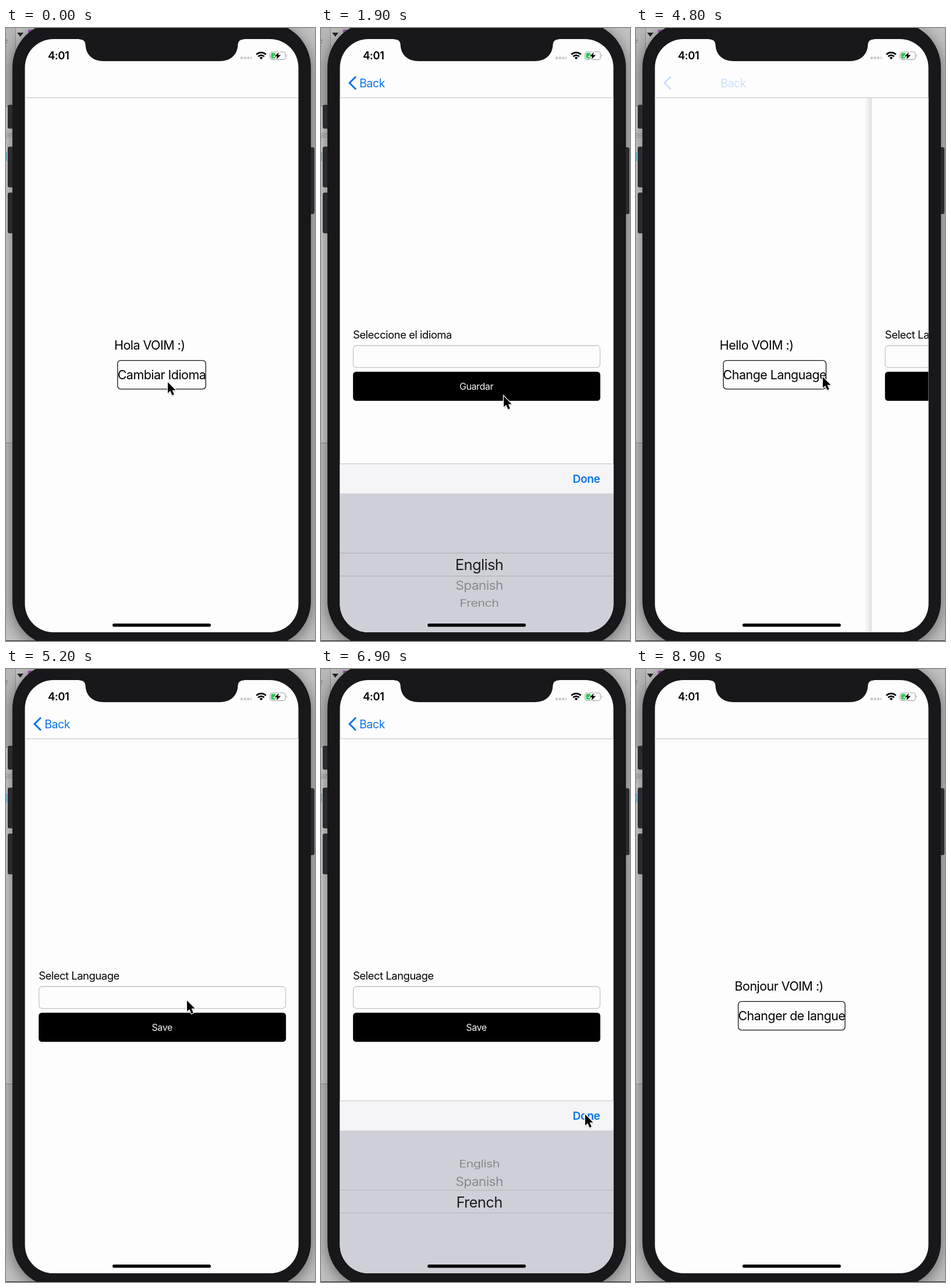
Animation of 531 by 1054 pixels, one loop 9.2 s. Source, as an HTML page:

```html
<!DOCTYPE html>
<html lang="en">
<head>
<meta charset="utf-8">
<title>Language switcher</title>
<style>
  html, body { margin: 0; width: 100%; height: 100%; overflow: hidden; background: #a9a9a9; }
  svg { display: block; width: 100%; height: 100%; }
  text { font-family: Inter, "Liberation Sans", sans-serif; letter-spacing: -.025em; white-space: pre; }
  .mid { text-anchor: middle; }
  .big { font-size: 21.5px; }
  .label { font-size: 18.4px; }
  .blue { fill: #0a75ea; }
  .paper { fill: #fefdfe; }
  .body { fill: #18171a; }
  .side { fill: #2b2b2d; }
</style>
</head>
<body>
<svg viewBox="0 0 531 1054">
  <defs>
    <clipPath id="screenClip"><rect x="32.5" y="19" width="470" height="1020" rx="49"/></clipPath>
    <filter id="blur" x="-20%" y="-10%" width="140%" height="120%"><feGaussianBlur stdDeviation="14"/></filter>
    <filter id="soft" x="-50%" y="-50%" width="200%" height="200%"><feGaussianBlur stdDeviation="1.2"/></filter>
    <linearGradient id="edge"><stop stop-opacity="0"/><stop offset="1" stop-opacity=".12"/></linearGradient>
    <linearGradient id="shine"><stop stop-color="#333"/><stop offset=".6" stop-color="#555"/><stop offset="1" stop-color="#888"/></linearGradient>
  </defs>

  <!-- desktop behind the phone -->
  <rect width="531" height="1054" fill="#c2c2c3"/>
  <rect width="16" height="134" fill="#b7b7b8"/>
  <rect y="134" width="16" height="579" fill="#d2d2d3"/>
  <path d="M16.5 0V134M0 134.5H16M0 713.5H16" stroke="#8f8f90" fill="none"/>
  <path d="M0 21H3M0 25H2" stroke="#555"/>
  <text x="-1" y="189" font-size="15" fill="#aaa">ar</text>
  <rect y="214" width="2" height="15" fill="#79b8d8"/>
  <rect x="38" y="3" width="12" height="11" fill="#a04fb4"/>
  <rect x="11" y="-4" width="513" height="1072" rx="78" opacity=".5" filter="url(#blur)"/>
  <path d="M19 8H30L24.500 15Z" fill="#222"/>
  <path d="M0 1053.500H531" stroke="#2a2a2c"/>

  <!-- phone -->
  <rect class="side" x="3" y="132" width="12" height="41" rx="3"/>
  <rect class="side" x="3" y="204" width="12" height="70" rx="3"/>
  <rect class="side" x="3" y="283" width="12" height="70" rx="3"/>
  <rect class="side" x="518" y="205" width="12" height="115" rx="3"/>
  <rect class="body" x="11" y="-10" width="513" height="1073" rx="78"/>

  <g clip-path="url(#screenClip)">
    <rect class="paper" x="32" y="19" width="471" height="1020"/>

    <g id="home">
      <text id="greeting" class="big" y="553"></text>
      <rect id="changeBox" y="571.6" height="49.2" rx="5.500" fill="none" stroke="#111" stroke-width="1.300"/>
      <text id="changeText" class="big mid" x="267.500" y="603.500"></text>
    </g>

    <g id="form">
      <rect x="20" y="120" width="12.500" height="920" fill="url(#edge)"/>
      <rect class="paper" x="32.500" y="120" width="470" height="920"/>
      <text id="prompt" class="label" x="55" y="533.500"></text>
      <rect x="55.500" y="546" width="424" height="37.700" rx="5.500" fill="none" stroke="#c3c3c6" stroke-width="1.300"/>
      <text id="value" class="label" x="63" y="570.500"></text>
      <rect x="55" y="591" width="425" height="50" rx="5.500"/>
      <text id="save" class="mid" x="267" y="622" font-size="16" fill="#f4f4f4"></text>
    </g>

    <path d="M32 119.800H503" stroke="#c9c9cc" stroke-width="1.300"/>
    <g id="back">
      <path d="M60 83.500L49 94.500L60 105.500" fill="none" stroke="#0a75ea" stroke-width="3"/>
      <text id="backText" class="blue" x="66" y="101.500" font-size="19.500">Back</text>
    </g>

    <g id="picker">
      <rect x="32" y="742" width="471" height="52" fill="#f5f4f6"/>
      <path d="M32 742.500H503" stroke="#c4c4c7" stroke-width="1.200"/>
      <text class="blue" x="479.500" y="775" text-anchor="end" font-size="19.300" font-weight="600">Done</text>
      <rect x="32" y="793.500" width="471" height="330" fill="#cfd0d7"/>
      <path d="M32 896H503M32 935.500H503" stroke="#b1b2b8" stroke-width="1.200"/>
      <g id="wheel"></g>
    </g>

    <!-- status bar -->
    <text x="72" y="54" font-size="18.500" font-weight="600" letter-spacing="0">4:01</text>
    <path d="M405 51.500H424" stroke="#c6c5c9" stroke-width="4" stroke-dasharray="4 1.700" transform="translate(-2)"/>
    <g fill="none" stroke="#000" stroke-width="2.700">
      <path d="M430.300 45.500a11.500 11.500 0 0 1 16.400 0M433.300 49a7.400 7.400 0 0 1 10.400 0"/>
      <path d="M438.500 54L435.700 51.200a4 4 0 0 1 5.600 0Z" fill="#000" stroke="none"/>
    </g>
    <rect x="453.700" y="41" width="26.500" height="13.300" rx="3.800" fill="none" stroke="#a3a3a6" stroke-width="1.200"/>
    <path d="M482 45.500q2 2 0 4.500Z" fill="#a3a3a6"/>
    <rect x="455.500" y="42.800" width="8" height="9.700" rx="2" fill="#31c653"/>
    <path d="M469 41.500L461.500 48.700H466L464.500 54L472.300 46.600H467.500Z" stroke="#fefdfe" stroke-width="2.400" paint-order="stroke"/>
    <rect id="indicator" x="183" y="1024" width="169" height="5.600" rx="2.800"/>
  </g>
  <path class="body" d="M126 18V19.500Q136 19.500 136.500 28C137 46 149 57 168 57H367C386 57 398 46 398.500 28Q399 19.500 409 19.500V18Z"/>

  <g id="cursor">
    <path d="M0 2V21L4.500 17L7.800 24.500L11 23L8 16H14Z" opacity=".35" filter="url(#soft)"/>
    <path d="M0 0V18.800L4.300 14.900L7.600 22.500L10.900 21.100L7.700 13.700H13.600Z" stroke="#fff" stroke-width="2.400" paint-order="stroke"/>
  </g>
</svg>

<script>
const LOOP = 9200, STEP = 100;
const el = Object.fromEntries([...document.querySelectorAll('[id]')].map(e => [e.id, e]));

const LANGUAGES = {
  es: { greeting: 'Hola VOIM :)', x: 186, change: 'Cambiar Idioma', width: 151.5, prompt: 'Seleccione el idioma', save: 'Guardar' },
  en: { greeting: 'Hello VOIM :)', x: 173, change: 'Change Language', width: 176.5, prompt: 'Select Language', save: 'Save' },
  fr: { greeting: 'Bonjour VOIM :)', x: 169.5, change: 'Changer de langue', width: 183.5, prompt: '', save: '' },
};

// One visit to the form: push, picker opens, picker closes, save returns home at once.
const VISITS = [
  { push: 670, open: 1590, close: 2400, end: 3300, lang: 'es', choice: 'English' },
  { push: 4770, open: 5550, close: 6950, end: 7700, lang: 'en', choice: 'French' },
];

// Pointer stops: time, x, y
const POINTER = [
  [0, 278, 609], [400, 259, 600], [1000, 259, 600], [1400, 296, 566], [1700, 298, 568],
  [1900, 314, 633], [2200, 453, 769], [2450, 453, 769], [2900, 318, 614], [3300, 308, 608],
  [4499, 308, 608], [4500, 321, 600], [4900, 321, 600], [5200, 311, 570], [5700, 311, 570],
  [6100, 386, 889], [6200, 386, 930], [6500, 384, 850], [6850, 454, 766], [7000, 454, 766],
  [7500, 333, 627], [7600, 333, 627], [7700, 332, 630],
];

const rows = ['English', 'Spanish', 'French'].map(name => {
  const row = document.createElementNS('http://www.w3.org/2000/svg', 'text');
  row.textContent = name;
  row.setAttribute('class', 'mid');
  row.setAttribute('y', 9);
  row.setAttribute('font-size', 25.5);
  return el.wheel.appendChild(row);
});

const set = (node, attrs) => { for (const k in attrs) node.setAttribute(k, attrs[k]); };
const shift = (node, x, y) => set(node, { transform: `translate(${x} ${y})` });
const progress = (t, start, length) => Math.min(1, Math.max(0, (t - start) / length));
const smooth = p => p * p * (3 - 2 * p);
const easeOut = p => 1 - (1 - p) ** 3;

// cubic-bezier(.2833, .99, .3183, .99), solved by bisection
function slideEase(x) {
  const curve = (s, a, b) => 3 * (1 - s) ** 2 * s * a + 3 * (1 - s) * s * s * b + s ** 3;
  let low = 0, high = 1;
  for (let i = 0; i < 24; i++) {
    const s = (low + high) / 2;
    if (curve(s, .2833, .3183) < x) low = s; else high = s;
  }
  return curve(low, .99, .99);
}

function pointerAt(t) {
  const i = POINTER.findIndex(stop => stop[0] > t);
  if (i < 0) return POINTER.at(-1).slice(1);
  const [t0, x0, y0] = POINTER[i - 1], [t1, x1, y1] = POINTER[i];
  const p = smooth((t - t0) / (t1 - t0));
  return [x0 + (x1 - x0) * p, y0 + (y1 - y0) * p];
}

function drawWheel(position) {
  rows.forEach((row, i) => {
    const d = i - position, far = Math.abs(d), angle = d * .339;
    const size = 1 - .11 * Math.min(far, 1) - .04 * Math.max(far - 1, 0);
    set(row, {
      transform: `translate(272 ${916.5 + 105 * Math.sin(angle)}) scale(${size} ${size * Math.cos(angle)})`,
      fill: far < .5 ? '#1d1d1f' : '#88898d',
    });
  });
}

function draw(t) {
  const lang = LANGUAGES[t < 3300 ? 'es' : t < 7700 ? 'en' : 'fr'];
  const visit = VISITS.find(v => t >= v.push && t < v.end);

  el.greeting.textContent = lang.greeting;
  set(el.greeting, { x: lang.x });
  el.changeText.textContent = lang.change;
  set(el.changeBox, { x: 267.5 - lang.width / 2, width: lang.width });

  const pushed = visit ? slideEase(progress(t, visit.push, 500)) : 0;
  shift(el.home, -141 * pushed, 0);
  shift(el.form, 470 * (1 - pushed), 0);
  set(el.form, { visibility: visit ? 'visible' : 'hidden' });
  set(el.back, { opacity: pushed });
  shift(el.backText, 100 * (1 - pushed), 0);

  let raised = 0, pressed = false;
  if (visit) {
    raised = easeOut(progress(t, visit.open, 430)) - easeOut(progress(t, visit.close, 430));
    pressed = t >= visit.end - 100;
    el.prompt.textContent = lang.prompt;
    el.save.textContent = lang.save;
    el.value.textContent = t >= visit.close ? visit.choice : '';
  }
  shift(el.picker, 0, 312 * (1 - raised));
  drawWheel(t < 4000 ? 0 : 2 * smooth(progress(t, 6200, 450)));
  set(el.save, { opacity: pressed ? .2 : 1 });
  set(el.indicator, { fill: pressed ? 'url(#shine)' : '#000' });

  shift(el.cursor, ...pointerAt(t));
  const away = (t >= 3800 && t < 4500) || t >= 8300;
  set(el.cursor, { visibility: away ? 'hidden' : 'visible' });
}

const start = performance.now();
function tick() {
  const t = (performance.now() - start) % LOOP;
  draw(Math.floor(t / STEP) * STEP);
  requestAnimationFrame(tick);
}
tick();
</script>
</body>
</html>
```
